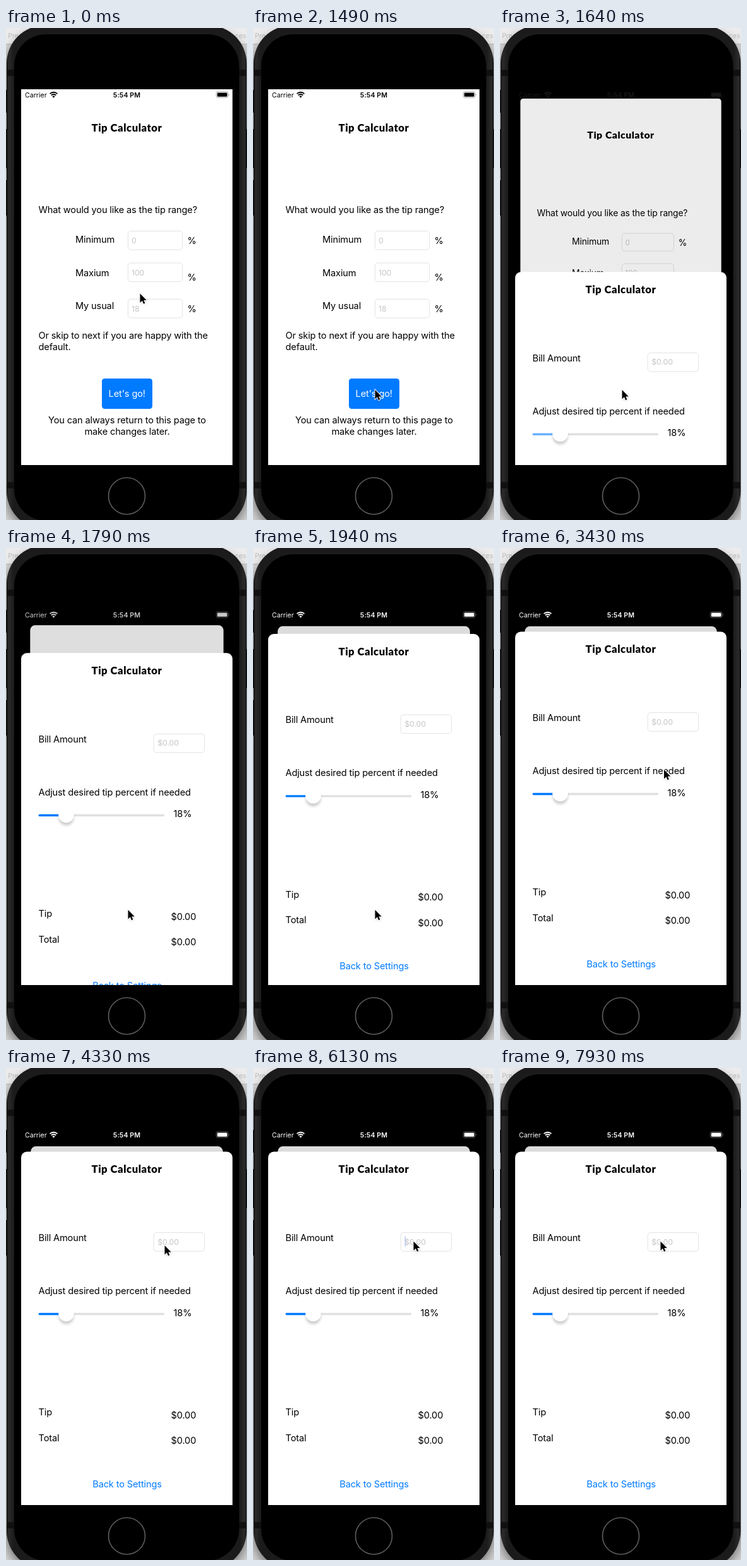
Animation, 382 px wide and 779 px high, one loop 8000 ms. Source, as an HTML page:

```html
<!DOCTYPE html>
<html lang="en">
<head>
<meta charset="utf-8">
<title>Tip Calculator</title>
<style>
  html, body { margin: 0; width: 100%; height: 100%; overflow: hidden; background: #000; }
  svg { display: block; width: 382px; height: 779px; }
  text { font: 14.6px Inter, "Noto Sans", sans-serif; letter-spacing: -.15px; white-space: pre; }
  .title { font: 900 16.6px Lato, "Open Sans", sans-serif; letter-spacing: .55px; }
  .mid { text-anchor: middle; }
  .hint { font-size: 12.3px; letter-spacing: -.1px; fill: #c5c5c7; }
  .small { font-size: 10.6px; letter-spacing: 0; }
  .bold { font-weight: 600; letter-spacing: .1px; }
  .field { fill: #fff; stroke: #dfdfdf; stroke-width: .9; }
</style>
</head>
<body>
<svg viewBox="0 0 382 779">
  <defs>
    <clipPath id="screen"><rect x="24" y="97" width="335" height="595"/></clipPath>
    <linearGradient id="edge">
      <stop offset="0" stop-color="#0c0c0c"/><stop offset=".008" stop-color="#2b2b2c"/>
      <stop offset=".03" stop-color="#1b1b1c"/><stop offset=".97" stop-color="#1b1b1c"/>
      <stop offset=".992" stop-color="#2b2b2c"/><stop offset="1" stop-color="#0c0c0c"/>
    </linearGradient>
    <filter id="blur" x="-50%" y="-50%" width="200%" height="200%"><feGaussianBlur stdDeviation="2.2"/></filter>
    <filter id="haze"><feGaussianBlur stdDeviation="9"/></filter>
  </defs>

  <!-- desktop and phone body -->
  <rect width="382" height="779" fill="#d6d6d6"/>
  <rect width="382" height="25" fill="#ececec"/>
  <path d="M0 25.5H382" stroke="#b5b5b5"/>
  <text class="small" x="3" y="16" fill="#bcbcbc">Pre</text>
  <text class="small" x="363" y="16" fill="#bcbcbc">ces</text>
  <rect x="1" y="6" width="380" height="794" rx="60" opacity=".5" filter="url(#haze)"/>
  <path d="M.6 98V134M.6 160V222M.6 241V297M381.6 160V222" stroke="#111" stroke-width="1.6"/>
  <rect x="1" y="-4" width="380.4" height="797" rx="60" fill="url(#edge)"/>
  <path d="M2 71H13M369 71H381M2 724H13M369 724H381" stroke="#101010" stroke-width="10"/>
  <rect x="13" y="10" width="356.5" height="770" rx="50"/>
  <circle cx="191.5" cy="741" r="29" fill="none" stroke="#5a5a5a" stroke-width="1.7"/>

  <g clip-path="url(#screen)">
    <g id="settings">
      <rect id="card" x="24" y="97" width="335" height="600" fill="#fff"/>
      <text class="title mid" x="191.5" y="164">Tip Calculator</text>
      <text x="51.5" y="293">What would you like as the tip range?</text>
      <text x="110" y="340">Minimum</text>
      <text x="110" y="392.5">Maxium</text>
      <text x="110" y="445">My usual</text>
      <rect class="field" x="193.4" y="321.5" width="86.4" height="29.6" rx="4.5"/>
      <rect class="field" x="193.4" y="372" width="86.4" height="29.6" rx="4.5"/>
      <rect class="field" x="193.4" y="429.4" width="86.4" height="29.6" rx="4.5"/>
      <text class="hint" x="199" y="341">0</text>
      <text class="hint" x="199" y="391.5">100</text>
      <text class="hint" x="199" y="448.8">18</text>
      <text x="287.5" y="342">%</text>
      <text x="287.5" y="399.5">%</text>
      <text x="287.5" y="449.5">%</text>
      <text x="51.5" y="492">Or skip to next if you are happy with the</text>
      <text x="51.5" y="510">default.</text>
      <rect x="152" y="555" width="80" height="48" rx="4.5" fill="#007aff"/>
      <text class="mid" x="191.7" y="584" fill="#fff">Let's go!</text>
      <text class="mid" x="192" y="625.5">You can always return to this page to</text>
      <text class="mid" x="192" y="643.5">make changes later.</text>
      <rect id="dim" x="23" y="96" width="337" height="602" opacity="0"/>
    </g>

    <g id="status" color="#000" fill="currentColor">
      <text class="small" x="30" y="110">Carrier</text>
      <path d="M69.6 104.2a8.3 8.3 0 0 1 11.8 0M71.8 106.5a5.2 5.2 0 0 1 7.4 0" fill="none" stroke="currentColor" stroke-width="1.9"/>
      <path d="M75.5 110.5l-2.1-2.1a3 3 0 0 1 4.2 0z"/>
      <text class="small bold mid" x="191.5" y="110">5:54 PM</text>
      <rect x="333.3" y="100.9" width="18.8" height="9.4" rx="2.6" fill="none" stroke="currentColor" stroke-width=".9" opacity=".38"/>
      <rect x="334.8" y="102.4" width="15.8" height="6.4" rx="1.4"/>
      <path d="M353.3 104a2 2 0 0 1 0 3.2z" opacity=".45"/>
    </g>

    <g id="sheet">
      <rect x="24" y="132.6" width="335" height="600" rx="9" fill="#fff"/>
      <text class="title mid" x="191.5" y="166.4">Tip Calculator</text>
      <text x="51.5" y="274">Bill Amount</text>
      <rect class="field" x="234.2" y="260.6" width="80.4" height="29.6" rx="4.5"/>
      <text class="hint" x="240.3" y="279.6">$0.00</text>
      <rect id="caret" x="240.4" y="266.4" width="1.9" height="16.4" rx=".9" fill="#3f6be3"/>
      <text x="51.5" y="358">Adjust desired tip percent if needed</text>
      <path d="M96 389.5H249.4" stroke="#e0e0e1" stroke-width="3.4" stroke-linecap="round"/>
      <path id="level" d="M53.2 389.5H95" stroke="#007aff" stroke-width="3.4" stroke-linecap="round"/>
      <circle cx="95.5" cy="393.5" r="12" opacity=".2" filter="url(#blur)"/>
      <circle cx="95.5" cy="388.8" r="12.4" fill="#fff"/>
      <text x="265.5" y="392.5">18%</text>
      <text x="51.5" y="550.3">Tip</text>
      <text x="261.5" y="554.8">$0.00</text>
      <text x="51.5" y="590.8">Total</text>
      <text x="261.5" y="595.3">$0.00</text>
      <text class="mid" x="192" y="664" fill="#007aff">Back to Settings</text>
    </g>
  </g>

  <g id="pointer">
    <path d="M.5 1.5V16L4 12.8 6.2 17.6 8.6 16.6 6.5 12H11Z" opacity=".25" filter="url(#blur)"/>
    <path d="M0 0V14.4L3.4 11.3 5.6 16.2 7.9 15.2 5.8 10.4H10.3Z" stroke="#fff" stroke-width="1.8" paint-order="stroke"/>
  </g>
</svg>
<script>
const LOOP = 8000, TICK = 149.7;
const el = id => document.getElementById(id);
const clamp = v => Math.min(1, Math.max(0, v));
const set = (id, name, value) => el(id).setAttribute(name, value);

// pointer stops: tick, x, y
const stops = [
  [0, 212.5, 420.5], [1, 207.5, 440.5], [4, 207.5, 440.5], [10, 193.5, 573], [16, 193.5, 573],
  [17, 193.5, 568.5], [23, 260, 351], [24, 264, 383], [29, 251.5, 281], [34, 251.5, 281],
  [35, 254.5, 274.5], [60, 254.5, 274.5]
];

function pointerAt(n) {
  const i = stops.findIndex(s => s[0] > n);
  const [a, ax, ay] = stops[i - 1], [b, bx, by] = stops[i];
  const u = (n - a) / (b - a), k = u * u * (3 - 2 * u);
  return [ax + (bx - ax) * k, ay + (by - ay) * k];
}

// critically damped spring that lifts the sheet
function sheetAt(n) {
  const x = Math.max(0, 2.685 * (n - 10.318));
  return 1 - (1 + x) * Math.exp(-x);
}

function caretAt(n) {
  return n < 36 ? 0 : clamp(1.15 + 1.35 * Math.cos((n - 36.8) * 2 * Math.PI / 6.55));
}

function draw(now) {
  const n = Math.floor((now % LOOP + 15) / TICK);
  const p = sheetAt(n), grey = Math.round(255 * p ** 4);
  set('settings', 'transform',
    `translate(${24 + 15.2 * p} ${97 + 27 * p}) scale(${1 - .0907 * p}) translate(-24 -97)`);
  set('card', 'rx', 9 * p);
  set('dim', 'opacity', .138 * p);
  set('status', 'color', `rgb(${grey},${grey},${grey})`);
  set('sheet', 'transform', `translate(0 ${559.4 * (1 - p)})`);
  set('level', 'opacity', clamp(p * 1.06));
  set('caret', 'opacity', caretAt(n));
  set('pointer', 'transform', `translate(${pointerAt(n)})`);
  requestAnimationFrame(draw);
}
draw(performance.now());
</script>
</body>
</html>
```
